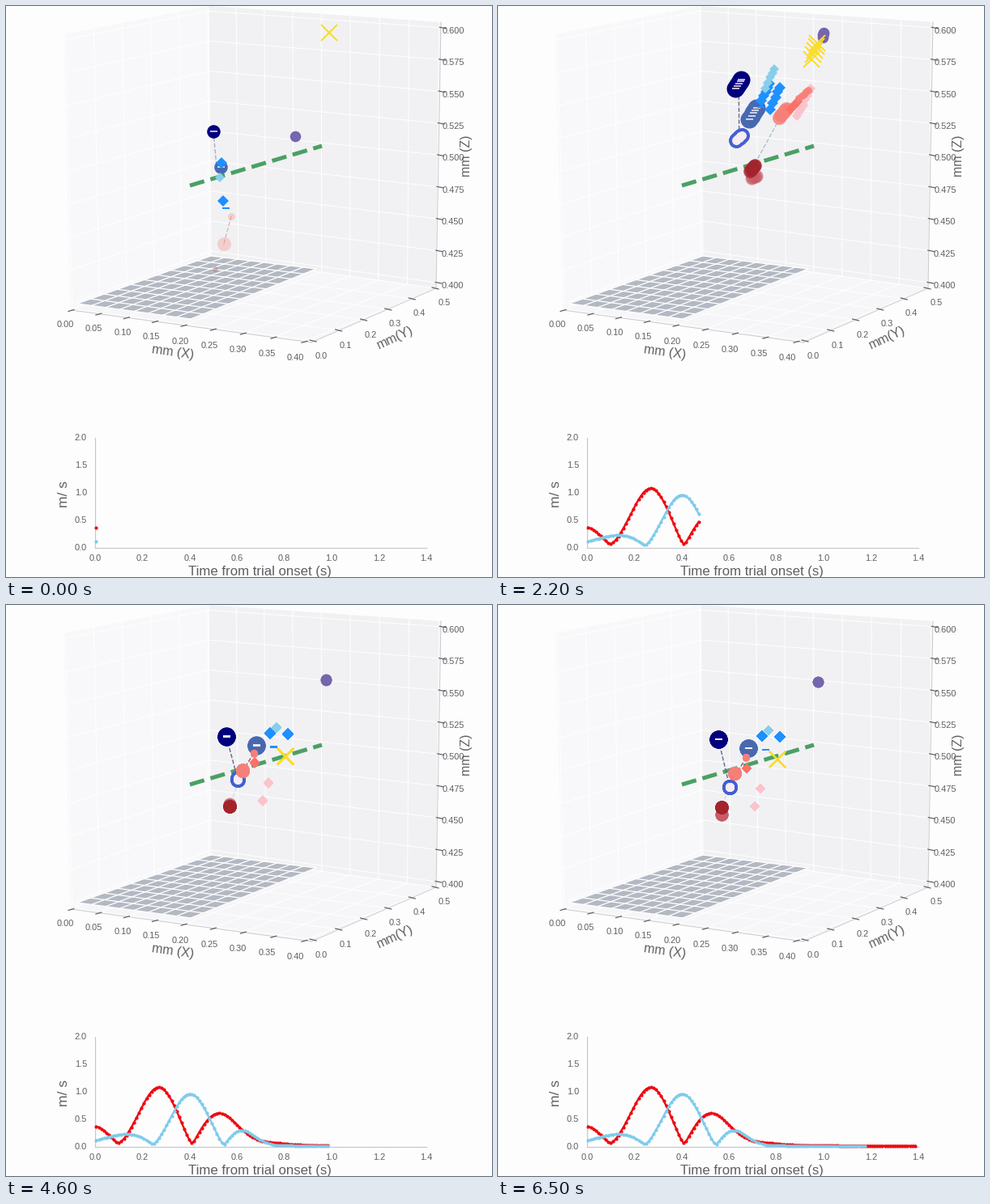
Write a matplotlib script that moves like this. It is 600x706 px and loops after 6600 ms.

```python
import numpy as np
import matplotlib.pyplot as plt
from matplotlib.animation import FuncAnimation
from matplotlib.patches import Polygon

W, H, DPI, FRAMES = 600, 706, 100, 66
PX = 72 / DPI
GREY = "#5f5f63"
plt.rcParams["font.family"] = "Liberation Sans"

fig = plt.figure(figsize=(W / DPI, H / DPI), dpi=DPI, facecolor="#fdfdfe")
ax = fig.add_axes([0, 0, 1, 1])
ax.set_xlim(0, W)
ax.set_ylim(H, 0)
ax.axis("off")


def seg(p, q, color, lw=1.0, **kw):
    return ax.plot([p[0], q[0]], [p[1], q[1]], color=color, lw=lw * PX, **kw)[0]


def label(x, y, s, size=11, **kw):
    kw = {"ha": "center", "va": "center", "color": GREY, **kw}
    ax.text(x, y, s, fontsize=size * PX, **kw)


def quad(pts, color, z=0):
    ax.add_patch(Polygon(pts, closed=True, fc=color, ec="none", zorder=z))


# ---- 3D box -------------------------------------------------------------
LEFT, BACK, RIGHT, FRONT = (80, 376), (253, 309), (531, 349), (377, 416)
TOP_L, TOP_B, TOP_R = (71, 35), (250, 0), (537, 20)


def front(i):
    x = 80 + 33.6 * i + 0.3 * i * i
    return x, 376 + (x - 80) * 40 / 297


def back(i):
    x = 253 + 33.6 * i + 0.15 * i * i
    return x, 309 + (x - 253) * 40 / 278


def top(i):
    x = 250 + 34 * i + 0.2 * i * i
    return x, (x - 250) * 20 / 287


def depth(k):
    return 380 + 32 * k - 0.36 * k * k, 414 - 13 * k


def height(j):
    return 532 + 0.65 * j, 342 - 39.4 * j


def draw_box():
    quad([LEFT, TOP_L, TOP_B, BACK], "#f8f8fa")
    quad([BACK, TOP_B, TOP_R, RIGHT], "#f1f1f3")
    quad([LEFT, BACK, RIGHT, FRONT], "#f6f6f8")
    for a, b in ((LEFT, FRONT), (FRONT, RIGHT), (RIGHT, TOP_R)):
        seg(a, b, "#cccccf", zorder=2)
    for i in range(9):
        x, y = front(i)
        seg((x, y), back(i), "white", zorder=1)
        seg(back(i), top(i), "white", zorder=1)
        seg((x - 3, y + 1.5), (x + 4, y - 0.5), GREY, 1.2, zorder=2)
        label(73 + 35.6 * i, 394 + 5.15 * i, f"{0.05 * i:.2f}")
    for k in range(6):
        x, y = depth(k)
        side = (82 + 33.6 * k, 375 - 13 * k)
        seg(side, (x, y), "white", zorder=1)
        seg(side, (73 + 35.2 * k, 34 - 6.8 * k), "white", zorder=1)
        seg((x - 5, y - 1), (x + 3, y + 1), GREY, 1.2, zorder=2)
        label(389 + 30.4 * k, 433.5 - 13.4 * k, f"{0.1 * k:.1f}")
    for j in range(9):
        x, y = height(j)
        corner = (253 - 0.37 * j, 303 - 37.1 * j)
        seg((80 - 1.1 * j, 368 - 40.75 * j), corner, "white", zorder=1)
        seg(corner, (x, y), "white", zorder=1)
        seg((x - 2, y - 0.5), (x + 6, y + 1), GREY, 1.2, zorder=2)
        label(551.5 + 0.15 * j, 346 - 39.4 * j, f"{0.4 + 0.025 * j:.3f}")
    label(206, 428, "mm (X)", 16, rotation=-8)
    label(481, 410, "mm(Y)", 16, rotation=25)
    label(569, 185, "mm (Z)", 16, rotation=90)


def draw_mat(cols=8, rows=10):
    a, b, c, d = map(np.array, ((88, 368), (253, 309), (383, 325), (228, 387)))
    quad([a, b, c, d], "#b3b8c2", 1.2)
    for u in np.linspace(0, 1, cols + 1):
        seg(a + (d - a) * u, b + (c - b) * u, "white", 1.3, zorder=1.5)
    for v in np.linspace(0, 1, rows + 1):
        seg(a + (b - a) * v, d + (c - d) * v, "white", 1.3, zorder=1.5)


def draw_chart():
    seg((110, 534), (110, 670), "#c8c8cc", 1.2)
    seg((110, 670), (519, 670), "#c8c8cc", 1.2)
    for i in range(5):
        label(100, 670 - 33.9 * i, f"{0.5 * i:.1f}", ha="right")
    for i in range(8):
        label(110 + 58.4 * i, 683, f"{0.2 * i:.1f}")
    label(72, 603, "m/ s", 17.5, rotation=90)
    label(313.5, 699.5, "Time from trial onset (s)", 16.8)


draw_box()
draw_mat()
draw_chart()
seg((227, 222), (390, 173), "#4aa064", 5, ls="--", zorder=3)


# ---- speeds: alternating bell-shaped strokes over a fading tremor -------
def bell(t, amp, mid, width):
    return amp * np.exp(-0.5 * ((t - mid) / width) ** 2)


def speed(t, strokes, tremor, rest):
    v = sum(bell(t, *s) for s in strokes)
    return np.hypot(v, rest + tremor * np.exp(-(t / 0.8) ** 4))


def red_speed(t):
    return speed(t, [(-.38, -.01, .07), (1.09, .27, .08), (-.61, .52, .08),
                     (-.06, .72, .1)], .05, .02)


def blue_speed(t):
    return speed(t, [(.23, .14, .11), (-.98, .4, .08), (.32, .61, .065)],
                 .04, .01)


def ball_speed(t):
    return speed(t, [(1, .18, .1), (-1, .55, .06)], 0, .001)


STEP, T0 = 0.02125, 0.005
grid = np.linspace(0, FRAMES, 1321)


class Stroke:
    """Distance travelled, the frames where the motion turns, final sag."""

    def __init__(self, rate, turns, sag):
        self.dist = np.cumsum(rate(T0 + STEP * grid))
        self.turns, self.sag = self(turns), sag

    def __call__(self, n):
        return np.interp(n, grid, self.dist)


red = Stroke(red_speed, [0, 4.5, 18.6, 39], 19)
blue = Stroke(blue_speed, [0, 11, 24.6, 39], 8)
ball = Stroke(ball_speed, [0, 0.1, 20, 39], 6)


def curve(color, z):
    return ax.plot([], [], color=color, lw=2.4 * PX, marker="o", ms=4.2 * PX,
                   mew=0, zorder=z)[0]


red_line, blue_line = curve("#ee0a10", 5), curve("#7fcbea", 6)
times = T0 + STEP / 2 * np.arange(2 * FRAMES)


def draw_speeds(n):
    t = times[:2 * n + 1]
    red_line.set_data(110 + 292 * t, 670 - 67.75 * red_speed(t))
    t = t[t < 1.18]
    blue_line.set_data(110 + 292 * t, 670 - 67.75 * blue_speed(t))


# ---- tracked points -----------------------------------------------------
class Part:
    """Marker that drops to `low`, reaches to `high` and settles at `rest`."""
    all = []

    def __init__(self, stroke, low, high, rest, marker, size, color, drop=None,
                 grow=1, fade=1, alpha=1, born=0, sag=None, mew=0, z=10):
        start = low if drop is None else (low[0] + 7, low[1] - drop)
        self.x, self.y = np.transpose([start, low, high, rest])
        self.sag = stroke.sag if sag is None else sag
        self.stroke, self.size, self.grow = stroke, size, grow
        self.fade, self.alpha, self.born = fade, alpha, born
        self.art = ax.plot([], [], ls="", marker=marker, color=color,
                           mew=mew * PX, zorder=z)[0]
        Part.all.append(self)

    def at(self, n):
        s, turns = self.stroke(n), self.stroke.turns
        settle = 1 - np.exp(-np.maximum(n - 39, 0) / 8)
        return (np.interp(s, turns, self.x),
                np.interp(s, turns, self.y) + self.sag * settle)

    def draw(self, n):
        smear = n + np.linspace(-.8, .8, 5) if n else np.zeros(1)
        self.art.set_data(*self.at(np.clip(smear, 0, FRAMES)))
        shade = np.interp(n, [8, 22], [self.fade, self.alpha])
        self.art.set_alpha(shade if n >= self.born else 0)
        self.art.set_markersize(
            self.size * PX * np.interp(n, [0, 12], [self.grow, 1]))


SALMON, PINK, SKY = "#f77f78", "#fbc3cb", "#1e90ff"

Part(ball, (357, 161), (402, 31), (395, 89), "o", 13.5, "#7566ae")
Part(red, (253, 398), (323, 208), (276, 230), "o", 16, "#c75a66",
     drop=49, grow=.4, fade=.05, alpha=.6, sag=30)
maroon = Part(red, (251, 367), (321, 192), (276, 248), "o", 16.5, "#a3242b",
              drop=42, grow=.4, fade=.25, alpha=.85, sag=2, z=11)


def joint(low, high, rest, color, drop, z):
    """Disc with a pale dash on it."""
    disc = Part(blue, low, high, rest, "o", 22, color, drop=drop, grow=.75, z=z)
    Part(blue, low, high, rest, "_", 9, "#fbf1f5", drop=drop, mew=1.5, z=z + .1)
    return disc


navy = joint((249, 175), (304, 85), (272, 158), "#00007d", 20, 12)
steel = joint((258, 232), (323, 118), (309, 169), "#4769b0", 33, 12.2)
for size, color, z in ((19, "#4160d2", 13), (11, "#f6ecf2", 13.1)):
    ring = Part(blue, (253, 209), (304, 156), (286, 200), "o", size, color,
                drop=10, born=1, sag=26, z=z)

Part(blue, (264, 299), (338, 83), (330, 171), "_", 9, SKY, drop=49, mew=2, z=14)
Part(blue, (259, 252), (341, 85), (326, 154), "D", 9.5, SKY, drop=58, z=14)
Part(blue, (261, 303), (354, 86), (348, 155), "D", 9.5, SKY, drop=62, z=14)
Part(blue, (257, 255), (347, 65), (334, 147), "D", 9, "#87ceeb", drop=43, z=14)

Part(red, (263, 330), (382, 115), (324, 209), "D", 8.5, PINK,
     drop=34, fade=.25, born=3, z=15)
Part(red, (256, 326), (393, 90), (317, 231), "D", 8.5, PINK,
     drop=30, fade=.25, born=3, z=15)
wrist = Part(red, (262, 309), (362, 120), (292, 200), "o", 17, SALMON,
             drop=15, fade=.3, alpha=.85, sag=8, z=16)
Part(red, (290, 245), (376, 112), (307, 184), "D", 8.5, "#fb7068",
     drop=-15, fade=.8, born=2, z=16)
knuckle = Part(red, (271, 292), (390, 97), (306, 175), "o", 9, SALMON,
               drop=32, fade=.3, alpha=.9, sag=14, z=16)
Part(red, (399, 33), (392, 47), (345, 182), "x", 20, "#fbdc25",
     sag=9, mew=2, z=18).x[:3], Part.all[-1].y[:3] = 399, 33


# ---- links --------------------------------------------------------------
def link(a, b, color, keys, alphas):
    art = seg((0, 0), (0, 0), color, 1.4, ls="--", zorder=9)
    return art, a, b, keys, alphas


links = [
    link(navy, ring, "#66688f", [0, 22], [.5, 1]),
    link(steel, ring, "#5a5f86", [26, 28], [.8, 0]),
    link(knuckle, ring, "#a8504c", [25, 30], [0, 1]),
    link(wrist, maroon, "#9fc0cc", [8, 20, 24, 31], [.1, .9, .9, .35]),
    link(knuckle, wrist, "#d3a8ac", [0, 8], [.8, 0]),
]


def update(n):
    for part in Part.all:
        part.draw(n)
    for art, a, b, keys, alphas in links:
        art.set_data(*np.transpose([a.at(n), b.at(n)]))
        art.set_alpha(np.interp(n, keys, alphas))
    draw_speeds(n)
    return []


anim = FuncAnimation(fig, update, frames=FRAMES, interval=100, repeat=True,
                     repeat_delay=0, init_func=lambda: update(0))
plt.show()
```
